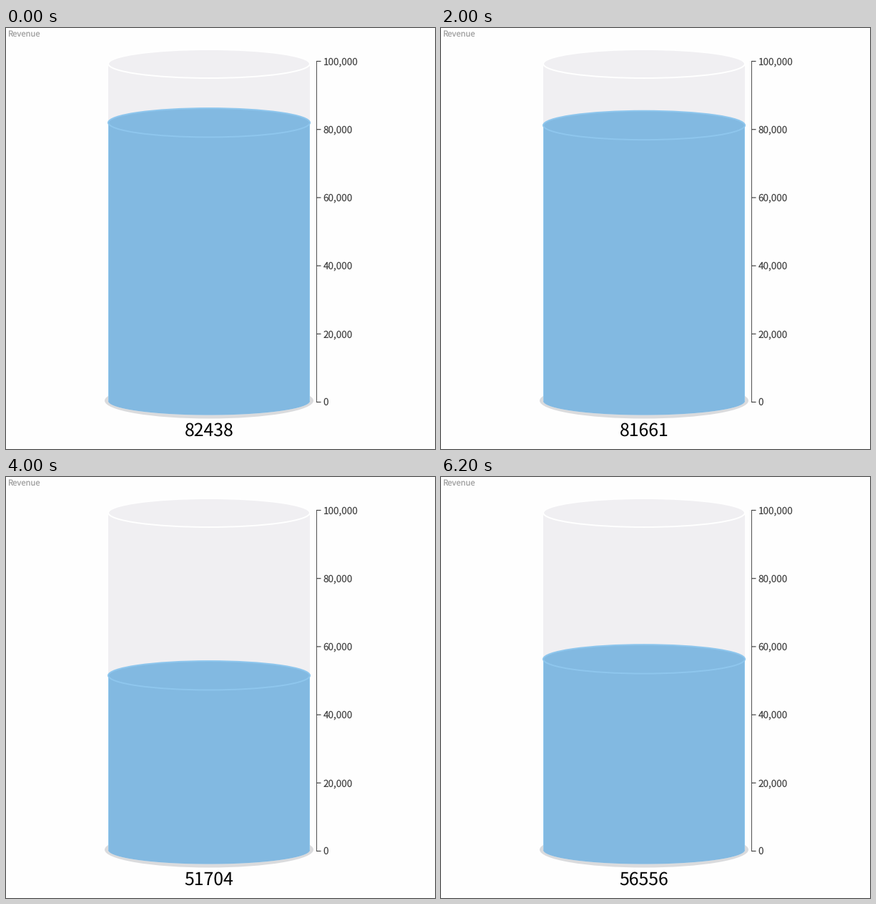
A matplotlib script that plays this animation: 600x588 px, repeating every 6.44 s.

```python
import numpy as np
import matplotlib.pyplot as plt
from matplotlib.animation import FuncAnimation
from matplotlib.patches import Ellipse, Polygon

plt.rcParams["text.hinting"] = "none"

W, H, DPI = 600, 588, 100
PT = 72 / DPI
STEP, LOOP = 40, 6440

# (start in ms, value)
READINGS = [(0, 82438), (1400, 81661), (2520, 55019), (3800, 51704), (5200, 56556)]

CX, RX, RY = 284, 141, 20.2
TOP, BOTTOM = 50, 521
BG, GLASS, RING = "#fefefe", "#f0eff2", "#dadbdd"
FLUID, EDGE = "#82b9e1", "#8ec6ed"
FONT = "Noto Sans CJK JP"

fig = plt.figure(figsize=(W / DPI, H / DPI), dpi=DPI, facecolor=BG)
ax = fig.add_axes([0, 0, 1, 1])
ax.set_xlim(0, W)
ax.set_ylim(H, 0)
ax.axis("off")


def label(x, y, text, px, color, ha="left"):
    return ax.text(x, y, text, fontsize=px * PT, color=color, ha=ha,
                   va="baseline", family=FONT)


def ellipse(y, rx, ry, z, **style):
    return ax.add_patch(Ellipse((CX, y), 2 * rx, 2 * ry, zorder=z, **style))


def line(xs, ys, color, px, z=6):
    return ax.plot(xs, ys, color=color, lw=px * PT, zorder=z, snap=False,
                   solid_capstyle="butt")[0]


def tube(y):
    """Outline of a cylinder side reaching from level y to the rounded base."""
    a = np.linspace(0, np.pi, 120)
    base = np.column_stack([CX + RX * np.cos(a), BOTTOM + 19.6 * np.sin(a)])
    return np.vstack([[CX + RX, y], base, [CX - RX, y]])


def level(value):
    return 521.2 - 471.8 * value / 100000


def reading(ms):
    return [v for start, v in READINGS if start <= ms][-1]


# Glass
ellipse(520.5, 146, 25, 1, fc=RING, lw=0)
ax.add_patch(Polygon(tube(TOP), fc=GLASS, lw=0, zorder=2))
ellipse(TOP, RX, 20, 3, fc=GLASS, ec="white", lw=2 * PT)

# Fluid
body = ax.add_patch(Polygon(tube(TOP), fc=FLUID, lw=0, zorder=4))
sides = [line([x, x], [TOP, BOTTOM], EDGE, 1, 5) for x in (CX - RX + 0.5, CX + RX - 0.5)]
surface = ellipse(TOP, RX, RY, 6, fc=FLUID, ec=EDGE, lw=2 * PT)

# Scale
line([434.5, 434.5], [46, 523], "#505050", 1)
for tick in range(0, 100001, 20000):
    y = 522.5 - 476 * tick / 100000
    line([434, 440.5], [y, y], "#444444", 1.2)
    label(443.5, y + 4.7, f"{tick:,}", 13.5, "#444444")

label(2.5, 11.6, "Revenue", 11.3, "#a0a0a0")
number = label(CX, 569.3, "", 24.8, "black", ha="center")


def update(i):
    value = reading(i * STEP)
    y = level(value)
    body.set_xy(tube(y))
    for side in sides:
        side.set_ydata([y, BOTTOM])
    surface.set_center((CX, y))
    number.set_text(str(value))
    return [body, *sides, surface, number]


anim = FuncAnimation(fig, update, frames=LOOP // STEP, interval=STEP,
                     repeat=True, repeat_delay=0)
plt.show()
```
